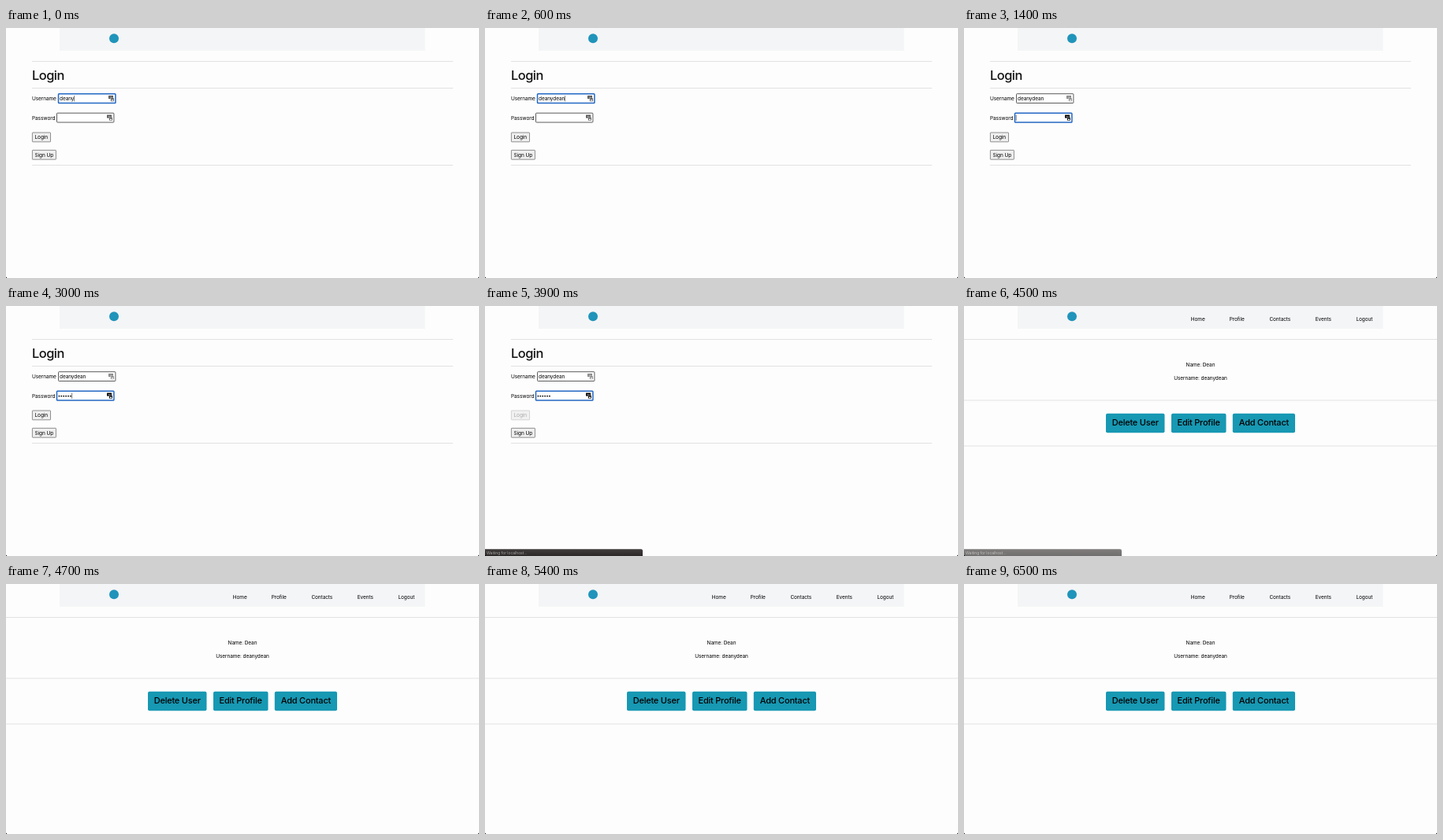
Recreate the animation shown at these times as an HTML page. Size 600 by 318 pixels, loop 6.7 s.

```html
<!DOCTYPE html>
<html lang="en">
<head>
<meta charset="utf-8">
<title>Login</title>
<style>
  html, body { margin: 0; height: 100%; overflow: hidden; background: #fdfdfd; }
  svg { display: block; }
  text { font: 6.5px Inter, sans-serif; letter-spacing: -.015em; fill: #000; }
  .title { font-size: 16.4px; font-weight: 500; letter-spacing: -.03em; fill: #111; }
  .rule { stroke: #e2e2e3; }
  .field { fill: #fff; stroke: #4a4a4a; stroke-width: .9; }
  .field.focus { stroke: #2367c4; stroke-width: 1.5; }
  .button rect { fill: #efefef; stroke: #757575; stroke-width: .8; }
  .button.disabled rect { fill: #f1f1f1; stroke: #ccc; }
  .button.disabled text { fill: #aaa; }
  .caret { stroke: #222; stroke-width: .6; }
  .mid text { text-anchor: middle; }
  .action rect { fill: #1798b3; }
  .action text { font-size: 11px; font-weight: 500; letter-spacing: -.02em; }
  #status text { font-size: 5px; letter-spacing: -.01em; fill: #a5a3a2; }
</style>
</head>
<body>
<svg width="600" height="318" viewBox="0 0 600 318">
  <defs>
    <linearGradient id="dark" x2="0" y2="1">
      <stop stop-color="#413d3c"/><stop offset="1" stop-color="#2b2827"/>
    </linearGradient>
    <g id="key">
      <path d="M0 0H6V4H0Z"/>
      <path d="M1 2H5" stroke="#fff" stroke-width=".6" stroke-dasharray=".7 .5"/>
      <path d="M2.8 3H7V7.3H2.8Z" stroke="#fff" stroke-width=".4"/>
      <path d="M4 5H5.9V6.4H4Z" fill="#fff"/>
    </g>
  </defs>
  <path d="M68 0H531.5V29H68Z" fill="#f4f5f7"/>
  <circle cx="137" cy="13.2" r="6" fill="#2094ba"/>

  <g id="login">
    <path class="rule" d="M33 42.5H567M33 76.5H567M33 174.5H567"/>
    <text class="title" x="33" y="66">Login</text>
    <text x="33" y="92">Username</text>
    <rect id="userField" class="field" x="66.5" y="83.7" width="72.4" height="11.8" rx=".8"/>
    <text id="user" x="68" y="92"></text>
    <use id="userKey" href="#key" x="130" y="86"/>
    <text x="33" y="116.5">Password</text>
    <rect id="passField" class="field" x="64.5" y="108.2" width="72.4" height="11.8" rx=".8"/>
    <g id="dots"></g>
    <use id="passKey" href="#key" x="128" y="110.5"/>
    <path id="caret" class="caret" d="M0 0V7.4"/>
    <g id="submit" class="button">
      <rect x="33.4" y="133" width="23.1" height="11.8" rx=".5"/>
      <text x="36.5" y="141.3">Login</text>
    </g>
    <g class="button">
      <rect x="33.4" y="155.4" width="30" height="11.8" rx=".5"/>
      <text x="36.5" y="163.7">Sign Up</text>
    </g>
  </g>

  <g id="profile" class="mid">
    <path class="rule" d="M0 42.5H600M0 120H600M0 178H600"/>
    <text x="296.7" y="18.6">Home</text>
    <text x="346.2" y="18.6">Profile</text>
    <text x="400.8" y="18.6">Contacts</text>
    <text x="455.8" y="18.6">Events</text>
    <text x="507.8" y="18.6">Logout</text>
    <text x="300" y="77">Name: Dean</text>
    <text x="300" y="93.7">Username: deanydean</text>
    <g class="action">
      <rect x="180" y="136.8" width="74.5" height="24.4" rx="2"/>
      <rect x="263" y="136.8" width="69.5" height="24.4" rx="2"/>
      <rect x="340.8" y="136.8" width="79.2" height="24.4" rx="2"/>
      <text x="217.2" y="152">Delete User</text>
      <text x="297.6" y="152">Edit Profile</text>
      <text x="380.4" y="152">Add Contact</text>
    </g>
  </g>

  <g id="status">
    <path d="M0 309.2H198Q200 309.2 200 311.2V318H0Z" fill="url(#dark)"/>
    <text x="2" y="315.6">Waiting for localhost...</text>
  </g>
  <path d="M0 316.6V318H1.4ZM600 316.6V318H598.6Z"/>
</svg>
<script>
  const LOOP = 6700;
  const USER = "deanydean";
  const userKeys = [100, 300, 500, 600];
  const passKeys = [1800, 2000, 2200, 2700, 2800, 3000];
  const DOT_STEP = 2.9;

  const $ = id => document.getElementById(id);
  const pressed = (times, t) => times.filter(time => t >= time).length;
  const show = (id, on) => $(id).setAttribute("visibility", on ? "visible" : "hidden");

  $("dots").innerHTML = passKeys.map((_, i) =>
    `<circle cx="${67.4 + i * DOT_STEP}" cy="114.6" r=".95"/>`).join("");

  function render(t) {
    const inPassword = t >= 1400;
    const count = pressed(passKeys, t);
    const onLogin = t < 4100;

    $("login").style.display = onLogin ? "" : "none";
    $("profile").style.display = onLogin ? "none" : "";

    $("user").textContent = USER.slice(0, 5 + pressed(userKeys, t));
    [...$("dots").children].forEach((dot, i) =>
      dot.setAttribute("visibility", i < count ? "inherit" : "hidden"));

    $("userField").classList.toggle("focus", !inPassword);
    $("passField").classList.toggle("focus", inPassword);
    $("userKey").setAttribute("fill", inPassword ? "#858585" : "#555");
    $("passKey").setAttribute("fill", inPassword ? "#000" : "#555");

    if (onLogin) {
      const x = inPassword ? 66.2 + count * DOT_STEP : 68.2 + $("user").getComputedTextLength();
      $("caret").setAttribute("transform", `translate(${x} ${inPassword ? 110.5 : 86})`);
    }
    show("caret", t < 1100 || inPassword && t < 3500);
    $("submit").classList.toggle("disabled", t >= 3600);

    show("status", t >= 3900 && t < 4700);
    const fade = (4700 - Math.floor(t / 100) * 100) / 300;
    $("status").setAttribute("opacity", Math.max(0, Math.min(1, fade)));
  }

  function tick() {
    render(performance.now() % LOOP);
    requestAnimationFrame(tick);
  }
  tick();
</script>
</body>
</html>
```
